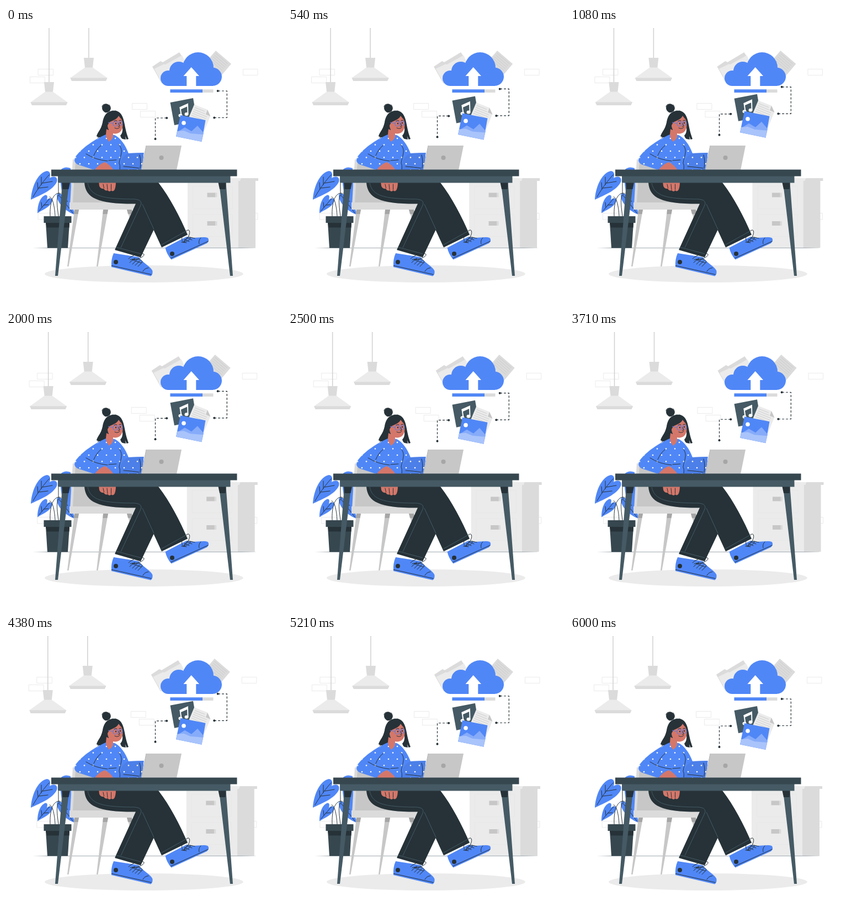
These frames come from a looping animation (500x500 px, 6040 ms). An HTML page:

```html
<!DOCTYPE html>
<html lang="en">
<head>
<meta charset="utf-8">
<title>Cloud upload</title>
<style>
  html, body { margin: 0; width: 100%; height: 100%; overflow: hidden; background: #fff; }
  svg { display: block; width: 100%; height: 100%; }
  .blue { fill: #5087f7; }
  .ink { fill: #263238; }
  .slate { fill: #37474f; }
  .steel { fill: #455a64; }
  .g1 { fill: #ebebeb; }
  .g2 { fill: #dbdbdb; }
  .g3 { fill: #c7c7c7; }
  .g4 { fill: #a6a6a6; }
  .skin { fill: #d4776a; }
  .white { fill: #fff; }
  .line { fill: none; stroke: #263238; stroke-width: 1; stroke-linecap: round; stroke-linejoin: round; }
  .seam { fill: none; stroke: #455a64; stroke-width: 1; }
  .pale { fill: none; stroke: #e6e6e6; stroke-width: .8; }
  .text { fill: none; stroke: #c7c7c7; stroke-width: .8; }
</style>
</head>
<body>
<svg viewBox="0 0 500 500">
  <defs>
    <pattern id="dots" width="16" height="23" patternUnits="userSpaceOnUse" x="146" y="196">
      <circle class="white" cx="4" cy="4" r="1.3"/>
      <circle class="white" cx="12" cy="15.5" r="1.3"/>
    </pattern>
    <linearGradient id="floor">
      <stop offset="0" stop-color="#455a64" stop-opacity="0"/>
      <stop offset=".06" stop-color="#455a64"/>
      <stop offset=".94" stop-color="#455a64"/>
      <stop offset="1" stop-color="#455a64" stop-opacity=".3"/>
    </linearGradient>
    <g id="lamp">
      <path d="M78 -60V98" stroke="#d0d0d0" stroke-width="1.5"/>
      <path class="g2" d="M69 98H87L85 116H71Z"/>
      <path class="g1" d="M71 115.500H85L111.500 134.500H44.500Z"/>
      <path class="g2" d="M44.300 134.300H111.700L109 140H47Z"/>
    </g>
    <path id="blouse" d="M183 192C161 201 138 217 126 233Q121 242 129 247L161 257.500 178 244 195 257.500H246L249.500 226 222 227C216 211 207 199 197 194Z"/>
  </defs>

  <g id="back">
    <g class="pale">
      <path d="M58 74.500H85.500V85.500H58ZM43.500 88.500H70.500V99.500H43.500ZM228.500 136.500H255.500V147.500H228.500Z"/>
      <path d="M243.500 150.500H270.500V161.500H243.500ZM429.500 74.500H456V85.500H429.500ZM430 335.500H456V347H430ZM58 335.500H85V347H58Z"/>
    </g>
    <use href="#lamp"/>
    <use href="#lamp" x="72" y="-44"/>
    <path class="g1" d="M329 276H421V398H329Z"/>
    <path class="g2" d="M421 276H452V398H421Z"/>
    <path class="g1" d="M324 272H426V277H324Z"/>
    <path class="g2" d="M426 272H457V277H424Z"/>
    <path class="pale" d="M338.500 286.500H410.500V327.500H338.500ZM338.500 338H410.500V378H338.500Z"/>
    <path class="g2" d="M378 298.500H382.500V306.500H378ZM378 350H382.500V358H378Z"/>
    <path class="g3" d="M364.500 298.500H379V306.500H364.500ZM364.500 350H379V358H364.500Z"/>
    <path class="g2" d="M265 70L280 60 284 62 314 44 318 50 334 90 282 100Z"/>
    <path class="g1" d="M268.500 74L286 65.500 289 66 319 49.500 338 90 283 100Z"/>
    <path class="g2" d="M380 41L408 65 386 91 355 70Z"/>
    <path class="text" d="M380 46l22 19M377.500 49l22 19M375 52l22 19M372.500 55l22 19M370 58l22 19"/>
  </g>

  <path d="M48 398.200H452V398.800H48Z" fill="url(#floor)"/>
  <ellipse class="g1" cx="250" cy="445.500" rx="180" ry="15.500"/>

  <!-- plant -->
  <g>
    <path class="blue" d="M45 311C46 291 56 263 74 259C81 260 81 266 79 272C87 266 95 270 92 279C85 294 62 303 45 311Z"/>
    <path class="blue" d="M57 335.500C57 320 62 305 72 302.500C76 303 75 308 74 311C80 306 85 309 83.500 314C79 326 66 329 57 335.500Z"/>
    <path class="blue" d="M100 256Q107 250 117 254L119 300Q120 318 124 338C110 333 92 318 92 303C93 297 101 299 104 306C98 289 98 270 100 256Z"/>
    <g class="line">
      <path d="M49 306C58 290 69 276 78 266M58 292L57 280M64 284L64 270M60 290L76 288M66 281L84 278"/>
      <path d="M60 331L79 309M65 325L64 316M68 321L77 320M96 303Q108 318 121 335M104 312L112 314M108 262L113 290"/>
      <path d="M89 341C88 322 84 306 79 306M80 341C79 318 84 299 97 299M95 341C92 318 90 302 99 300M95 300V281"/>
    </g>
    <path class="slate" d="M72 352H115L112 398.500H75Z"/>
    <path class="ink" d="M72 353H115L114.500 361.500H74Z"/>
    <path class="slate" d="M68.500 341H118.500V353H68.500Z"/>
  </g>

  <!-- chair -->
  <g>
    <path class="g3" d="M124 329H132L113.500 432H111ZM176 329H185L166.500 432H164ZM219 329H228L245 400H242Z"/>
    <path class="g4" d="M124 329H132L130.500 337H122.500ZM176 329H185L183.500 337H175.500ZM219 329H228L230 337H221Z"/>
    <path class="g2" d="M121 238Q128 238 141 242L150 320H116Z"/>
    <path class="g3" d="M126 240L160 250 205 316H121Z"/>
    <path class="g2" d="M115 316H235V329H115Z"/>
  </g>

  <!-- trousers and shoes -->
  <g>
    <path class="blue" d="M195 408L240 415C249 426 262 432 265.500 440Q266 448 262 449.500L191 433Q190 419 195 408Z"/>
    <path class="line" d="M191.500 430.500L263 446.500M248 441Q251 435 258 434.500"/>
    <path class="line" d="M222 418C230 410 247 406 250 410C251 415 236 420 228 420C235 421 246 428 247 424C247 418 231 417 225 420M224 425L233 417M229 428L238 419M234 430L242 422M239 432L246 425"/>
    <circle class="ink" cx="199" cy="424" r="4"/>
    <path class="blue" d="M288.500 398L327 378C342 383 357 376 366 380.500Q369 386 364 390L299.500 419.500Q291 410 288.500 398Z"/>
    <path class="line" d="M298.500 417L366 386.500M350 391Q348 385 353 380"/>
    <path class="line" d="M320 387C314 378 327 365 331 366C336 370 329 383 322 387C326 380 332 377 334 380C334 384 327 387 321 388M318 388L327 389M323 383L332 387M328 380L337 384M333 379L342 381"/>
    <circle class="ink" cx="301" cy="409" r="4"/>
    <path class="ink" d="M142 280H276C297 307 315 342 329 374.500L282 397.500 267.500 366 244 415.500 197 402 235 318.500C168 319 144 309 142 280Z"/>
    <path class="seam" d="M148 281C153 305 176 309 225 310Q249 309 244 321L208 398M199 397L244 409M247 319L268 365M281 393L326 368"/>
  </g>

  <!-- hand below the desk -->
  <path class="skin" d="M168 278H199Q199 290 196 294Q193 297 190.500 294Q188 298 184 294Q180 296 177 291Q171 292 169 286Z"/>
  <path class="line" d="M176 283L177.500 290M183 283L184 293M190.500 283V293"/>

  <!-- upper body -->
  <g>
    <path class="ink" d="M195 149.500C181 151 177 160 175 171C172 185 166 188 164 196Q168 200 183 197L191 170Z"/>
    <path class="ink" d="M202 151C210 154 213 164 215 175C217 186 219 193 222 201L218.500 202 216 196 217 202 211 201Q208 199 207 195Q212 190 211 180Z"/>
    <ellipse class="ink" cx="181.500" cy="145.500" rx="7.500" ry="8" transform="rotate(-20 181 145)"/>
    <path class="line" d="M187 151Q192 145 187 139M174 143Q174 138 180 138M166 200L173 190"/>
    <use class="blue" href="#blouse"/>
    <path d="M208 240Q213 230 222 227L249.500 226 246 257H205Z" fill="#4c7fe8"/>
    <use href="#blouse" fill="url(#dots)"/>
    <path class="line" d="M145 228Q162 239 184 241M172 213Q164 219 159 231M205 212C214 222 206 234 205 245Q207 248 206 257M186 240L200 239M213 251Q230 252 241 254M242 230Q245 240 243 254"/>
    <path class="skin" d="M160 257.500Q169 246 179 243Q189 248 195 257.500Z"/>
    <path class="skin" d="M182 183L194 189V198Q191 203 187 206Q181 200 181 192Z"/>
    <path class="skin" d="M184 168C190 164 199 160 205 158Q211 164 211.500 176C211.500 187 204 192 197 191.500C189 191 182 183 184 168Z"/>
    <path class="ink" d="M183 179C176 161 186 150 198 149.500Q209 152 212 167Q207 164 204 159C202 165 192 168 187 171Q185 174 183 179Z"/>
    <g fill="none" stroke="#6579d8" stroke-width="1.200">
      <circle cx="198" cy="173.500" r="4.300"/>
      <circle cx="207.500" cy="172.500" r="3.500"/>
      <path d="M202.300 173H204M194 173L185 171"/>
    </g>
    <circle class="ink" cx="199" cy="173" r="1.200"/>
    <circle class="ink" cx="207" cy="172" r="1.200"/>
    <path class="line" d="M196 168.500Q199 166.500 201 168M205 167.500L209 167M204 173L206 178Q204 179 203 178M197 181Q202 184 206 180"/>
  </g>

  <path class="g3" d="M254 213H318L309 257.500H245Z"/>
  <path d="M254 213L245 257.500" stroke="#b5b5b5"/>
  <circle class="g4" cx="281.500" cy="235" r="4"/>

  <!-- desk -->
  <path class="steel" d="M102 280H114.500L94 449H89ZM386 280H398.500L411 449H406Z"/>
  <path class="ink" d="M101 280H116L113.500 292H102.500ZM384.500 280H398.500L397.500 292H387Z"/>
  <path class="steel" d="M94 268H406.500V280.500H94Z"/>
  <path class="slate" d="M82 256.600H418.500V268.600H82Z"/>

  <!-- cloud -->
  <g class="blue">
    <circle cx="294" cy="91" r="14"/>
    <circle cx="313" cy="78" r="17"/>
    <circle cx="348" cy="72" r="28"/>
    <circle cx="374.500" cy="88.300" r="16.500"/>
    <path d="M294 80H375V104.900H294Z"/>
  </g>
  <path class="white" d="M335.700 71L350 87H344.300V105.500H327.300V87H321.500Z"/>
  <path class="g2" d="M297.500 111.300H375.500V117H297.500Z"/>
  <path class="blue" d="M297.500 111.300H356V117H297.500Z"/>

  <!-- files -->
  <g id="files">
    <path class="steel" d="M297.500 135L339 127 346 168 305 176Z"/>
    <path d="M317.500 158L315.500 144 329 138 329.500 156" fill="none" stroke="#fff" stroke-width="2"/>
    <path class="white" d="M314.500 143.500L330 136.500V141.500L315.500 148Z"/>
    <ellipse class="white" cx="316" cy="158.500" rx="3.500" ry="3"/>
    <ellipse class="white" cx="327" cy="156" rx="3.500" ry="3"/>
    <path class="g1" d="M341 138.500L365 148 370 160 359 187 327 172Z"/>
    <path class="g3" d="M365 148L370.500 160 362 156.500Z"/>
    <path class="text" d="M342 144l18 7M340.500 147.500l20 8M339 151l25 10M337.500 154.500l25 10M336 158l25 10"/>
    <path class="blue" d="M316 158L361.500 167 354.500 206 308 196.500Z"/>
    <path d="M311 188L324 180 336 187 347 177 358 190 356 199Z" fill="#86abf9"/>
    <path d="M310.200 187L322 186 334 191 357 193 354.500 206 308 196.500Z" fill="#a9c4fb"/>
    <circle class="white" cx="322" cy="172" r="3.800"/>
    <path d="M384 114H400.300V162.500H377M291 163H270.500V201" fill="none" stroke="#263238" stroke-width="1.200" stroke-dasharray="4 3"/>
    <g class="ink">
      <circle cx="383.700" cy="114" r="2"/>
      <circle cx="377.300" cy="162.500" r="2"/>
      <circle cx="291.200" cy="163" r="2"/>
      <circle cx="270.500" cy="201" r="2"/>
    </g>
  </g>
</svg>
<script>
  const LOOP = 6040, SPAN = 6000, STEP = 600;
  const sway = [0, -1, 2, -4, 4, -4, 4, -4, 2, -1, 0];
  const back = document.getElementById('back');
  const files = document.getElementById('files');

  function swayAt(t) {
    const i = Math.min(Math.floor(t / STEP), sway.length - 2);
    return sway[i] + (sway[i + 1] - sway[i]) * (t / STEP - i);
  }

  // Rises 10 px and sinks back every three seconds.
  function liftAt(t) {
    return Math.abs(t % 3000 - 1500) / 150 - 10;
  }

  function draw() {
    const t = Math.min(performance.now() % LOOP, SPAN);
    back.setAttribute('transform', `translate(${swayAt(t)} 0)`);
    files.setAttribute('transform', `translate(0 ${liftAt(t)})`);
    requestAnimationFrame(draw);
  }
  draw();
</script>
</body>
</html>
```
